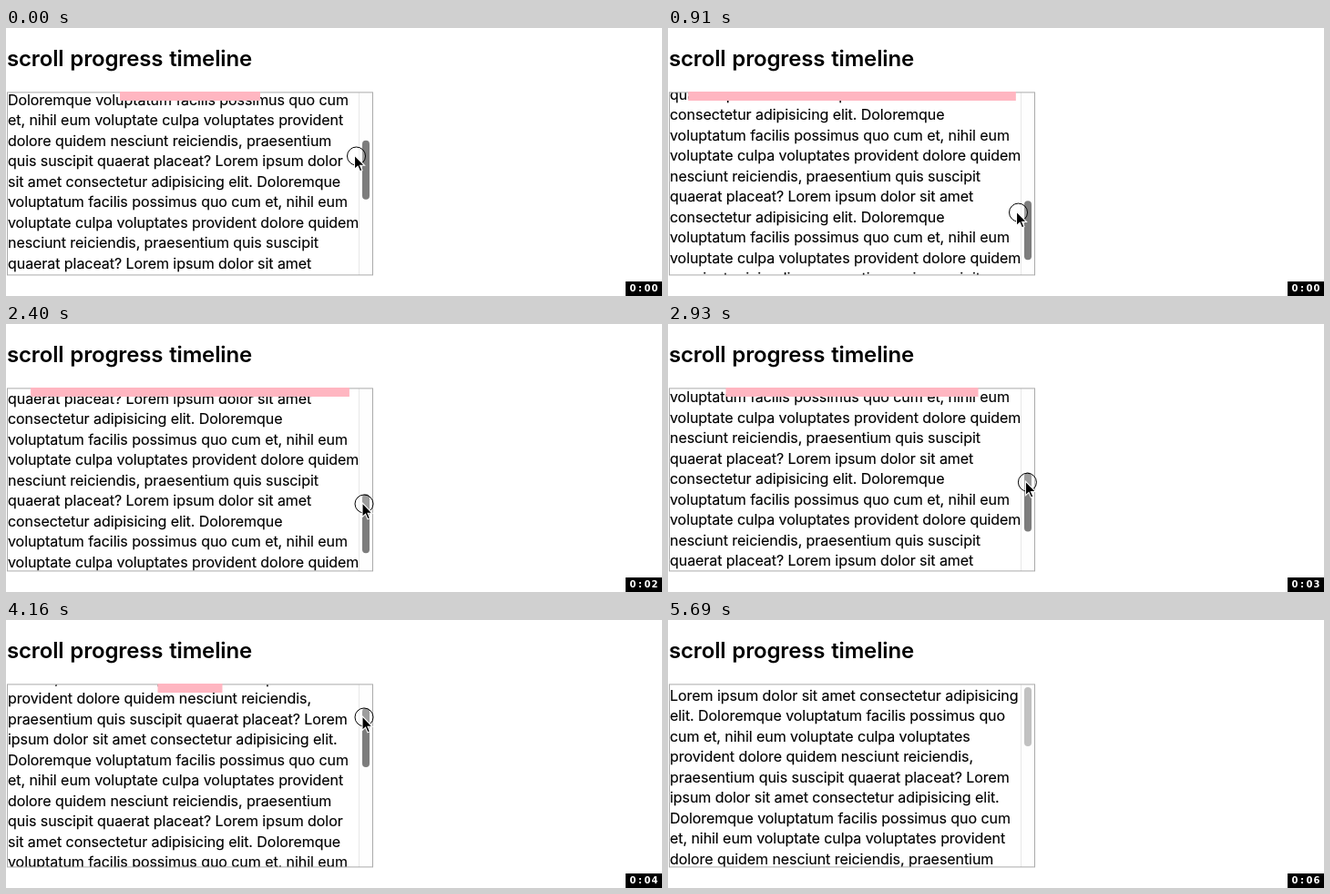
An HTML page that plays this animation: 720 px wide and 295 px high, repeating every 6.05 s.

```html
<!DOCTYPE html>
<html lang="en">
<head>
<meta charset="utf-8">
<title>scroll progress timeline</title>
<style>
  html, body { margin: 0; width: 100%; height: 100%; overflow: hidden; background: #fff; }
  #stage { position: relative; width: 720px; height: 295px; overflow: hidden; color: #000; font-family: Inter, sans-serif; }
  #stage > * { position: absolute; }
  h1 { left: 1px; top: 19px; margin: 0; font-size: 24px; font-weight: 600; line-height: 30px; letter-spacing: -.15px; word-spacing: 1px; white-space: nowrap; }
  #box { left: 2px; top: 71px; width: 400px; height: 201px; overflow: hidden; }
  #text { position: absolute; left: 0; top: .5px; font-size: 16px; line-height: 22.5px; letter-spacing: -.06px; white-space: pre; -webkit-text-stroke: .15px #000; }
  #track { position: absolute; left: 385px; top: 0; width: 14px; height: 201px; border-left: 1px solid #e8e8e8; background: #fefefe; }
  #thumb { position: absolute; left: 3px; top: 3px; width: 8px; height: 65px; border-radius: 4px; }
  #frame { left: 0; top: 0; }
  #bar { left: 1px; top: 70px; width: 402px; height: 10px; background: #ffb6c1; }
  #cursor { left: 0; top: 0; overflow: visible; }
  #clock { left: 680px; top: 279px; width: 40px; height: 16px; box-sizing: border-box; padding: 0 4px; display: grid; grid-template-columns: repeat(4, 8px); background: #000; color: #fff; font: bold 10px/16px "DejaVu Sans", sans-serif; text-align: center; }
</style>
</head>
<body>
<div id="stage">
  <h1>scroll progress timeline</h1>
  <div id="box">
    <div id="text"></div>
    <div id="track"><div id="thumb"></div></div>
  </div>
  <svg id="frame" width="720" height="295">
    <rect x="1.5" y="70.9" width="401" height="201" fill="none" stroke="#aaa"/>
  </svg>
  <div id="bar"></div>
  <svg id="cursor" width="1" height="1">
    <circle r="10" fill="#fff" fill-opacity=".25" stroke="#000"/>
    <path d="M-2-1V14.5L1.6 11.2 4 16.8 6.5 15.7 4.1 10.3H9Z" fill="#000" stroke="#fff" stroke-width="1.1"/>
  </svg>
  <div id="clock"><span>0</span><span>:</span><span>0</span><span id="secs">0</span></div>
</div>
<script>
const LOOP = 6050, MAX_SCROLL = 363, THUMB_TRAVEL = 130, SECOND = 943;
const $ = id => document.getElementById(id);
const text = $('text'), thumb = $('thumb'), bar = $('bar'), cursor = $('cursor'), secs = $('secs');

const intro = [
  'Lorem ipsum dolor sit amet consectetur adipisicing',
  'elit. Doloremque voluptatum facilis possimus quo',
  'cum et, nihil eum voluptate culpa voluptates',
  'provident dolore quidem nesciunt reiciendis,',
  'praesentium quis suscipit quaerat placeat? Lorem',
  'ipsum dolor sit amet consectetur adipisicing elit.',
  'Doloremque voluptatum facilis possimus quo cum',
  'et, nihil eum voluptate culpa voluptates provident',
  'dolore quidem nesciunt reiciendis, praesentium',
  'quis suscipit quaerat placeat? Lorem ipsum dolor',
  'sit amet consectetur adipisicing elit. Doloremque'
];
const middle = [
  'voluptatum facilis possimus quo cum et, nihil eum',
  'voluptate culpa voluptates provident dolore quidem',
  'nesciunt reiciendis, praesentium quis suscipit'
];
const join = [
  'quaerat placeat? Lorem ipsum dolor sit amet',
  'consectetur adipisicing elit. Doloremque'
];
text.textContent = [
  ...intro, ...middle, ...join, ...middle, ...join, ...middle, 'quaerat placeat?'
].join('\n');

// time, cursor x, cursor y, scroll offset
const keys = [
  [0, 384.5, 141, 139],
  [910, 384.5, 203, 324.6],
  [1180, 385.8, 218, 363],
  [1290, 386.5, 226, 363],
  [1490, 386.5, 235, 363],
  [1690, 386.5, 235, 363],
  [1940, 390.5, 215, 363],
  [2400, 393, 198, 316],
  [3420, 395, 149.7, 182.5],
  [4160, 393, 107, 64.2],
  [4900, 393.5, 83, 0],
  [5100, 393.5, 78, 0],
  [5340, 393.5, 78, 0],
  [5690, 560, 312, 0],
  [LOOP, 560, 312, 0]
];

const slope = (i, c) => (keys[i + 1][c] - keys[i][c]) / (keys[i + 1][0] - keys[i][0]);

// Tangent that never overshoots between keys
function tangent(i, c) {
  if (i === 0) return slope(0, c);
  if (i === keys.length - 1) return 0;
  const a = slope(i - 1, c), b = slope(i, c);
  return a * b > 0 ? 2 * a * b / (a + b) : 0;
}

function sample(t, c) {
  let i = 0;
  while (i < keys.length - 2 && t >= keys[i + 1][0]) i++;
  const p = keys[i], q = keys[i + 1], h = q[0] - p[0], u = (t - p[0]) / h, v = 1 - u;
  return v * v * (1 + 2 * u) * p[c] + u * u * (3 - 2 * u) * q[c]
    + h * u * v * (v * tangent(i, c) - u * tangent(i + 1, c));
}

function draw(t) {
  const at = t < 50 ? 0 : t;
  const x = sample(at, 1), y = sample(at, 2), scroll = sample(at, 3);
  const progress = scroll / MAX_SCROLL;
  text.style.transform = `translateY(${-scroll}px)`;
  thumb.style.transform = `translateY(${progress * THUMB_TRAVEL}px)`;
  thumb.style.background = x > 402 ? '#c1c1c1' : '#7d7d7d';
  bar.style.transform = `scaleX(${progress})`;
  cursor.style.transform = `translate(${x}px, ${y}px)`;
  cursor.style.visibility = t < 5690 ? 'visible' : 'hidden';
  secs.textContent = Math.min(6, Math.floor(t / SECOND));
}

const start = performance.now();
function tick() {
  draw((performance.now() - start) % LOOP);
  requestAnimationFrame(tick);
}
tick();
</script>
</body>
</html>
```
